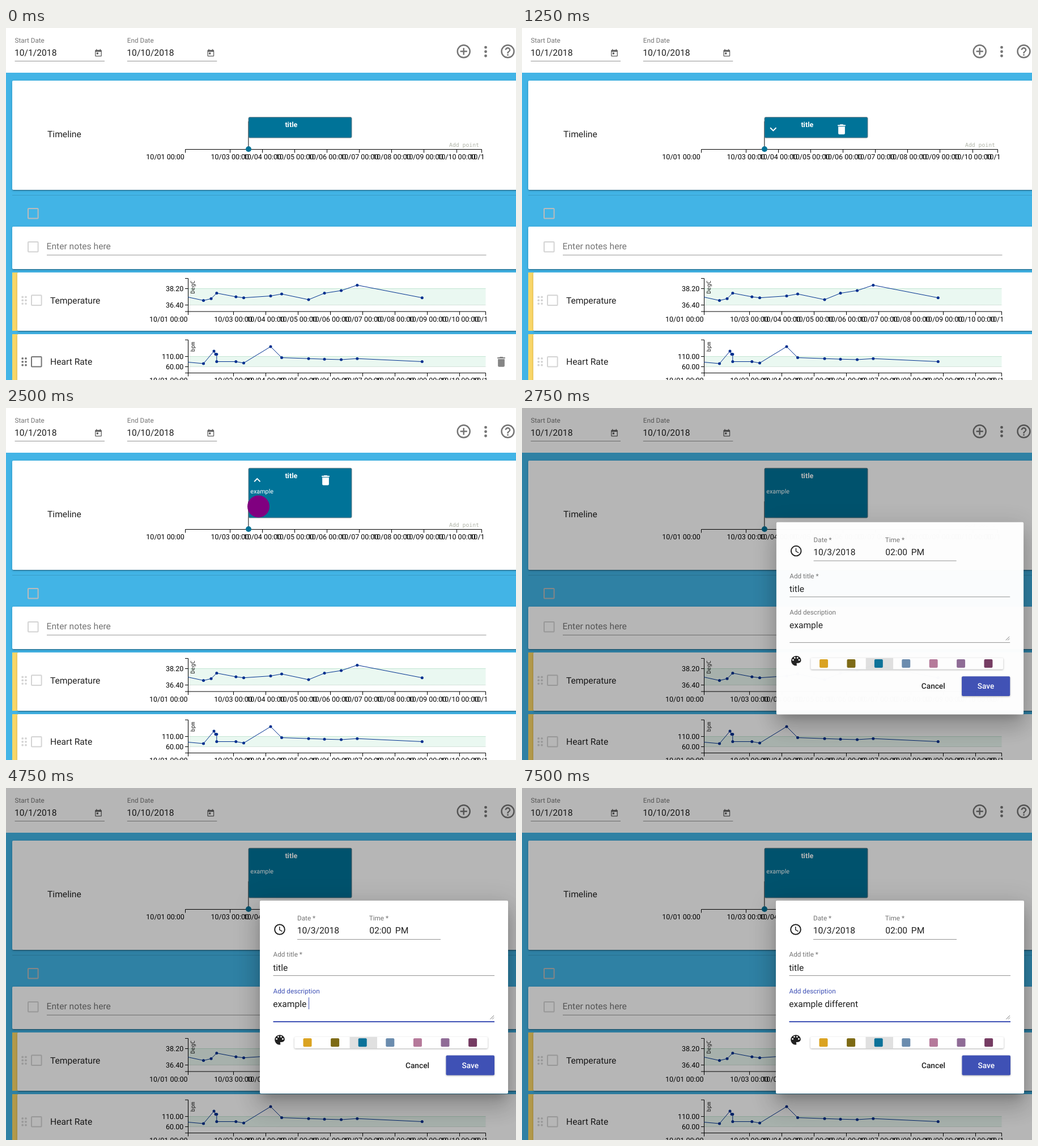
These frames come from a looping animation (900 px wide and 622 px high, 8 s). An HTML page:

```html
<!DOCTYPE html>
<html lang="en">
<head>
<meta charset="utf-8">
<title>Timeline</title>
<style>
html, body { margin: 0; width: 100%; height: 100%; overflow: hidden; background: #fff; }
#stage { position: absolute; left: 0; top: 0; width: 900px; height: 622px; overflow: hidden; }
#stage > * { position: absolute; }
.layer { left: 0; top: 0; display: block; }
.card { left: 11px; width: 900px; background: #fff; border-radius: 2px;
  box-shadow: 0 3px 1px -2px rgba(0,0,0,.2), 0 2px 2px rgba(0,0,0,.14), 0 1px 5px rgba(0,0,0,.12); }
.stripe { left: 11px; width: 11px; height: 103px; background: #fbd768; }
.row { left: 20px; height: 103px; }
text { font-family: Roboto, sans-serif; font-size: 15.65px; fill: #212121; white-space: pre;
  text-rendering: geometricPrecision; }
.small { font-size: 11.74px; fill: #757575; }
.axis { font-size: 12.5px; fill: #000; }
.mono { font-family: "DejaVu Sans Mono", monospace; font-size: 9.78px; }
.bold { font-size: 12.5px; font-weight: 700; fill: #fff; }
.button { font-size: 13.7px; font-weight: 500; }
.mid { text-anchor: middle; }
.end { text-anchor: end; }
.tools { color: #d4d4d4; }
.tools .trash { visibility: hidden; }
.tools.hover { color: #757575; }
.tools.hover .trash { visibility: visible; }
#shade { inset: 0; background: rgba(0,0,0,.288); }
#dialog { left: 448px; top: 199px; width: 437.5px; height: 340.5px; background: #fff; border-radius: 2px;
  box-shadow: 0 11px 15px -7px rgba(0,0,0,.2), 0 23px 37px 3px rgba(0,0,0,.14), 0 9px 45px 8px rgba(0,0,0,.12); }
#dialog svg { display: block; }
.raised { filter: drop-shadow(0 1.5px 1.5px rgba(0,0,0,.3)); }
</style>
</head>
<body>
<div id="stage">
  <div style="left:0;top:79px;width:900px;height:543px;background:#42b4e6"></div>
  <div class="card" style="top:93px;height:193px"></div>
  <div class="card" style="top:351px;height:75px"></div>
  <div class="stripe" style="top:432px"></div>
  <div class="card row" style="top:432px"></div>
  <div class="stripe" style="top:541px"></div>
  <div class="card row" style="top:541px"></div>
  <svg class="layer" id="page" width="900" height="622"></svg>
  <div id="shade"></div>
  <div id="dialog"><svg id="form" width="437.5" height="340.5" viewBox="448 199 437.5 340.5"></svg></div>
  <svg class="layer" width="900" height="622"><circle id="press" cx="445.5" cy="174" r="19.5" fill="#800080"/></svg>
</div>
<script>
const $ = id => document.getElementById(id);
const RING = 'M12 2a10 10 0 1 0 0 20a10 10 0 1 0 0-20zm0 18a8 8 0 1 1 0-16a8 8 0 1 1 0 16z';
const ICONS = {
  today: 'M19 3h-1V1h-2v2H8V1H6v2H5c-1.1 0-2 .9-2 2v14c0 1.1.9 2 2 2h14c1.1 0 2-.9 2-2V5c0-1.1-.9-2-2-2zm0 16H5V8h14v11zM7 10h5v5H7z',
  add: RING + 'M13 7h-2v4H7v2h4v4h2v-4h4v-2h-4V7z',
  more: [5.8, 12, 18.2].map(y => `M12 ${y - 2}a2 2 0 1 0 0 4a2 2 0 1 0 0-4z`).join(''),
  help: RING + 'M11 18h2v-2h-2v2zM12 6c-2.21 0-4 1.79-4 4h2c0-1.1.9-2 2-2s2 .9 2 2c0 2-3 1.75-3 5h2c0-2.25 3-2.5 3-5 0-2.21-1.79-4-4-4z',
  clock: RING + 'M12.5 7H11v6l5.25 3.15.75-1.23-4.5-2.67z',
  trash: 'M6 19c0 1.1.9 2 2 2h8c1.1 0 2-.9 2-2V7H6v12zM19 4h-3.5l-1-1h-5l-1 1H5v2h14V4z',
  down: 'M16.59 8.59L12 13.17 7.41 8.59 6 10l6 6 6-6z',
  up: 'M12 8l-6 6 1.41 1.41L12 10.83l4.59 4.58L18 14z',
  palette: 'M12 3a9 9 0 0 0 0 18c.83 0 1.5-.67 1.5-1.5 0-.39-.15-.74-.39-1.01-.23-.26-.38-.61-.38-.99 0-.83.67-1.5 1.5-1.5H16c2.76 0 5-2.24 5-5 0-4.42-4.03-8-9-8z' +
    [[6.5, 10.5], [9.5, 6.5], [14.5, 6.5], [17.5, 10.5]]
      .map(([x, y]) => `M${x} ${y - 1.5}a1.5 1.5 0 0 1 0 3a1.5 1.5 0 0 1 0-3z`).join('')
};

const text = (x, y, s, cls = '', more = '') => `<text x="${x}" y="${y}" class="${cls}" ${more}>${s}</text>`;
const rect = (x, y, w, h, fill, more = '') => `<rect x="${x}" y="${y}" width="${w}" height="${h}" fill="${fill}" ${more}/>`;
const path = (d, stroke = '#000', width = 1) => `<path d="${d}" fill="none" stroke="${stroke}" stroke-width="${width}"/>`;
const icon = (name, x, y, fill = '#757575', size = 23.5, more = '') =>
  `<path d="${ICONS[name]}" fill="${fill}" fill-rule="evenodd" transform="translate(${x} ${y}) scale(${size / 24}) translate(-12 -12)" ${more}/>`;
const checkbox = (x, y, color) => rect(x + 1, y + 1, 17.6, 17.6, 'none', `stroke="${color}" stroke-width="2" rx="1"`);

// Day axis; third is the position of 10/03
function dayAxis(left, right, y, third) {
  const day = n => third + (n - 3) * 57.1;
  let ticks = '', labels = '';
  for (const n of [1, 3, 4, 5, 6, 7, 8, 9, 10, 11]) {
    if (n > 1 && n < 11) ticks += `M${Math.floor(day(n)) + .5} ${y}v6`;
    labels += text(day(n), y + 17.6, `10/${String(n).padStart(2, 0)} 00:00`, 'axis mid');
  }
  return path(`M${left} ${y + 6}v-6H${right}v6` + ticks) +
    `<svg width="${right + 2.5}" height="622">${labels}</svg>`;
}

function row(id, top, name, unit, marks, points) {
  const [hi, lo] = marks.map(m => m[1]);
  let dots = '', handle = '';
  points.slice(1).forEach(([x, y]) => dots += `<circle cx="${x}" cy="${y}" r="2.5" fill="#00308f"/>`);
  for (let i = 0; i < 6; i++)
    handle += `<circle cx="${29.2 + i % 2 * 5.8}" cy="${top + 43.3 + (i >> 1) * 5.9}" r="1.9" fill="currentColor"/>`;
  return `<g class="tools" id="${id}">${handle}${checkbox(44, top + 39.3, 'currentColor')}
      ${icon('trash', 874, top + 49.3, '#858585', 23.5, 'class="trash"')}</g>` +
    text(78, top + 54.5, name) +
    rect(322, hi, 524.5, lo - hi, '#eaf8f1') +
    path(`M322 ${hi}H846.5`, '#c3e6d3') +
    `<path d="M322 ${lo}H846.5" stroke="#b5c9bd" stroke-dasharray="1 1"/>` +
    path(`M316 ${top + 10.5}h5.5V${top + 69}h-5.5M316 ${hi}h5M316 ${lo}h5`) +
    marks.map(([s, y]) => text(313.3, y + 4.5, s, 'axis end')).join('') +
    text(0, 0, unit, 'mono end', `transform="translate(333 ${top + 14}) rotate(-90)"`) +
    path('M' + points.join('L'), '#00308f') + dots +
    dayAxis(321.5, 846.5, top + 69, 401);
}

const dateField = (x, label, value) =>
  text(x, 26, label, 'small') + text(x - .5, 49.1, value) +
  path(`M${x} 58.5h158.5`, '#949494') + icon('today', x + 147.5, 44.5, '#606060', 15.65);

$('page').innerHTML =
  dateField(15.5, 'Start Date', '10/1/2018') + dateField(213.8, 'End Date', '10/10/2018') +
  icon('add', 807.7, 41.3, '#757575', 29.3) + icon('more', 846.5, 41.7, '#757575', 29.3) +
  icon('help', 885.5, 41.3, '#757575', 29.3) +
  text(73, 193.1, 'Timeline') + dayAxis(316.5, 839.5, 214.5, 395.3) +
  text(782, 210, 'Add point', 'mono', 'style="fill:#b0b4a8"') +
  path('M427.8 165V214', '#555', 1.5) + '<circle cx="428" cy="214" r="5" fill="#007398"/>' +
  '<g id="note"></g>' +
  path('M11 295.5H900', 'rgba(0,0,0,.13)') + checkbox(38, 318, '#bbb') +
  checkbox(38, 377, '#d4d4d4') + text(71.5, 391.4, 'Enter notes here', '', 'style="fill:#757575"') +
  path('M72 401.2H847.5', '#949494') +
  row('temperature', 432, 'Temperature', 'DegC', [['38.20', 460.5], ['36.40', 489.5]],
    [[321, 475.5], [348.5, 481.5], [362, 478.3], [371.8, 468.5], [405.8, 475], [419.5, 476.7], [467, 473.5],
     [486.5, 470], [534, 480], [562, 468.6], [591.5, 464], [619.8, 454.4], [734.3, 476.7]]) +
  row('heart', 540.6, 'Heart Rate', 'bpm', [['110.00', 580.5], ['60.00', 598.5]],
    [[321, 590.5], [348.5, 593], [367, 571], [370, 576.5], [371.8, 576.5], [371.8, 589.5], [405.8, 589.5],
     [419.5, 592], [467, 563], [486.5, 582.5], [534, 584.2], [562, 585.2], [591.5, 586], [619.8, 584.2], [734.3, 589.5]]);

const noteBox = (top, name, tools) =>
  rect(428, top, 182, 194 - top, '#007398', 'stroke="#6b7c84" rx="2"') +
  text(503.3, top + 17.5, 'title', 'bold mid') +
  (name === 'up' ? text(431.3, 150.5, 'example', '', 'style="font-size:10.75px;fill:#fff"') : '') +
  (tools ? icon(name, 443.3, top + 21.2, '#fff') + icon('trash', 564, top + 21.4, '#fff') : '');

const swatches = ['#dba321', '#7d6a14', '#0b7299', '#6b8cae', '#b5799a', '#8f6b96', '#753b62'];
$('form').innerHTML =
  icon('clock', 483, 250, '#212121') +
  text(514, 234, 'Date *', 'small') + text(513.7, 257.2, '10/3/2018') +
  text(640.7, 234, 'Time *', 'small') + text(641.2, 257.2, '02:00') + text(686.8, 257.2, 'PM') +
  path('M514 267.5H767', '#949494') +
  text(471.5, 298.2, 'Add title *', 'small') + text(471.2, 322.5, 'title') + path('M471.5 331.5H862', '#949494') +
  text(471.5, 363.2, 'Add description', 'small', 'id="label"') + text(471.2, 386.6, '', '', 'id="entry"') +
  rect(471.5, 412, 390.5, 1, '#949494', 'id="line"') + rect(534, 370, 1, 21, '#3f51b5', 'id="caret"') +
  path('M854.5 408.5l6.5-6.5M858 408.5l3-3', '#777') +
  icon('palette', 483, 445, '#212121') +
  rect(509, 440, 341, 20, '#fff', 'class="raised" rx="2"') + rect(606.5, 440, 48.5, 20, '#e0e0e0') +
  swatches.map((c, i) => rect(524.5 + i * 48.6, 442.2, 15, 15, c, 'rx="2"')).join('') +
  text(726, 494.7, 'Cancel', 'button mid') +
  rect(776.5, 472.5, 85.5, 35, '#3f51b5', 'class="raised" rx="2"') +
  text(819.2, 494.7, 'Save', 'button mid', 'style="fill:#fff"');

const typed = [[0, 'example '], [5750, 'example d'], [6000, 'example diff'], [6250, 'example differ'],
  [6500, 'example differen'], [6750, 'example different']];
const blinks = [3250, 3750, 4000, 4250, 4750, 5500, 5750, 7500];
const show = (id, on) => $(id).style.display = on ? '' : 'none';
let drawn = '';

function draw(t) {
  const within = (a, b) => t >= a && t < b;
  const open = t >= 2750, focus = t >= 3250, settling = within(2750, 3000);

  $('heart').classList.toggle('hover', t < 250);
  $('temperature').classList.toggle('hover', within(250, 500));
  show('press', within(1750, 2000) || within(2500, 2750));
  const note = t < 2000 ? noteBox(157.7, 'down', t >= 1250) : noteBox(106.3, 'up', !open);
  if (note !== drawn) $('note').innerHTML = drawn = note;

  show('shade', open);
  show('dialog', open);
  if (!open) return;
  $('dialog').style.transform = settling ? 'translateY(2.1px) scale(.996)' : '';
  $('dialog').style.opacity = settling ? .98 : 1;
  $('label').style.fill = focus ? '#3f51b5' : '';
  $('line').setAttribute('fill', focus ? '#3f51b5' : '#949494');
  $('line').setAttribute('height', focus ? 2 : 1);
  $('entry').textContent = typed.filter(([at]) => t >= at).pop()[1];
  $('caret').setAttribute('x', Math.floor(471.2 + $('entry').getComputedTextLength()));
  show('caret', blinks.filter(at => t >= at).length % 2);
}

function tick(now) {
  draw((now - start) % 8000);
  requestAnimationFrame(tick);
}
const start = performance.now();
draw(0);
requestAnimationFrame(now => tick(Math.max(now, start)));
</script>
</body>
</html>
```
